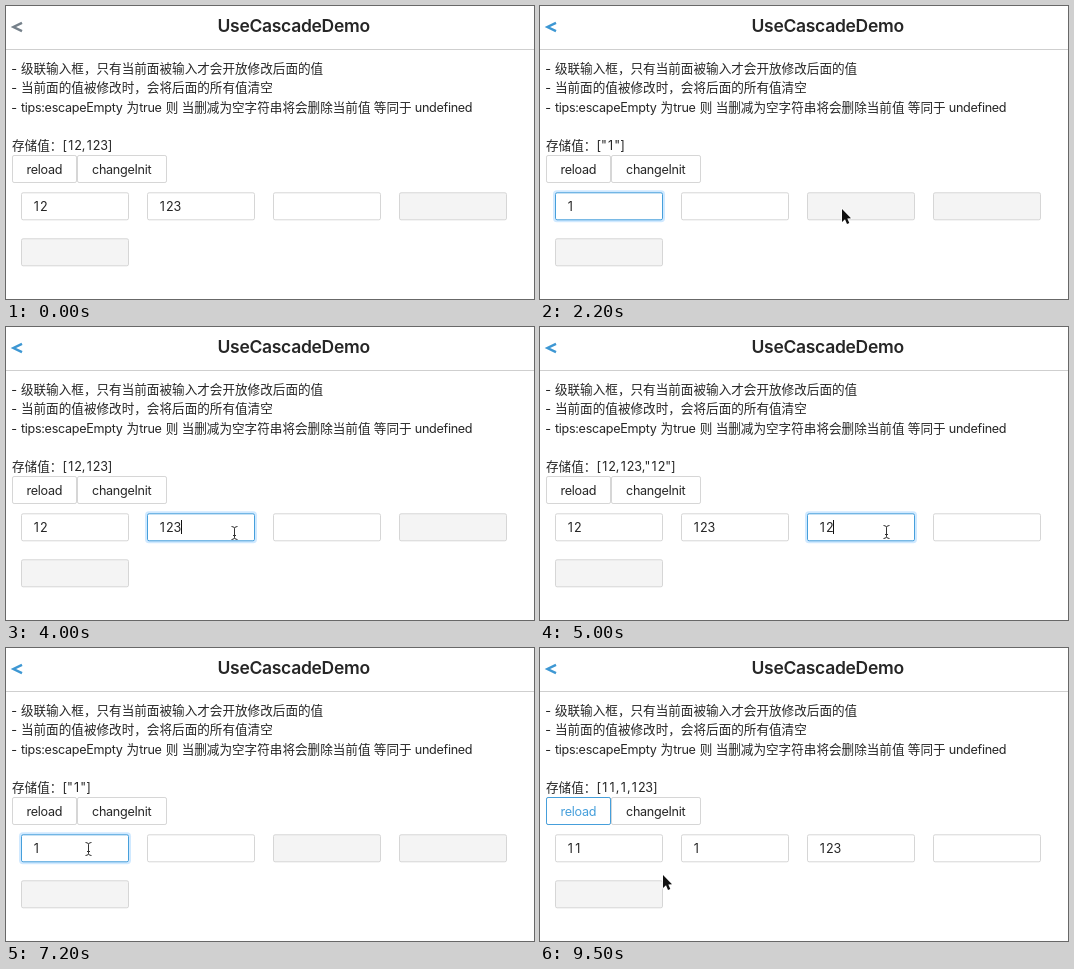
Animation, 528 px wide and 293 px high, one loop 9900 ms. Source, as an HTML page with a canvas:

```html
<!DOCTYPE html>
<html lang="zh">
<head>
<meta charset="utf-8">
<title>UseCascadeDemo</title>
<style>
html, body { margin: 0; width: 100%; height: 100%; overflow: hidden; background: #fff; }
canvas { display: block; width: 528px; height: 293px; }
</style>
</head>
<body>
<canvas id="stage"></canvas>
<script>
const W = 528, H = 293, LOOP = 9900, TICK = 100;
const BLUE = '#469fdb', INK = '#262626', BORDER = '#d6d6d6';
const LATIN = 'Inter, Roboto, sans-serif';
const HAN = '"Noto Sans CJK SC", "Noto Sans CJK", sans-serif';
const DIGIT = 7.45; // advance of a tabular figure

const canvas = document.getElementById('stage');
const ctx = canvas.getContext('2d');
const dpr = window.devicePixelRatio || 1;
canvas.width = W * dpr;
canvas.height = H * dpr;

const NOTES = [
  '- 级联输入框，只有当前面被输入才会开放修改后面的值',
  '- 当前面的值被修改时，会将后面的所有值清空',
  '- tips:escapeEmpty 为true 则 当删减为空字符串将会删除当前值 等同于 undefined'
];

const buttons = [
  { id: 'reload', x: 6, y: 149, w: 65, h: 28, tx: 20.5 },
  { id: 'changeInit', x: 71, y: 149, w: 90, h: 28, tx: 86 }
];
const inputs = [[15, 186.3], [141, 186.3], [267, 186.3], [393, 186.3], [15, 232.3]]
  .map(([x, y]) => ({ x, y, w: 108, h: 28 }));

// What the user does: focus is an input index or a button id.
const steps = [
  { t: 0, vals: [12, 123], focus: null },
  { t: 700, vals: [12, 123], focus: 0 },
  { t: 1500, vals: ['1'], focus: 0 },
  { t: 2600, vals: [12, 123], focus: 'reload' },
  { t: 3600, vals: [12, 123], focus: 1 },
  { t: 4600, vals: [12, 123], focus: 2 },
  { t: 4800, vals: [12, 123, '1'], focus: 2 },
  { t: 5000, vals: [12, 123, '12'], focus: 2 },
  { t: 5700, vals: [11, 1, 123], focus: 'changeInit' },
  { t: 6500, vals: [11, 1, 123], focus: 0 },
  { t: 6600, vals: ['1'], focus: 0 },
  { t: 8100, vals: [11, 1, 123], focus: 'reload' }
];

// Pointer path: time, x, y.
const path = [
  [200, 242, 275], [300, 241, 265], [400, 241, 265], [500, 284, 246],
  [700, 104, 206], [1100, 88, 205], [2000, 88, 205],
  [2200, 302, 203], [2500, 44, 166], [2700, 50, 165], [2800, 91, 164],
  [3000, 140, 176], [3500, 226, 205], [3900, 228, 206], [4100, 228, 206],
  [4500, 342, 205], [5100, 346, 205], [5600, 125, 166], [5900, 127, 167],
  [6100, 127, 167], [6500, 86, 203], [7100, 82, 201], [7400, 82, 201],
  [8000, 42, 166], [8400, 44, 167], [9000, 123, 227]
];

const ease = p => p * p * (3 - 2 * p);
const inside = (b, p) => p.x >= b.x && p.x <= b.x + b.w && p.y >= b.y && p.y <= b.y + b.h;
const stepAt = t => steps.filter(s => s.t <= t).pop();

function pointerAt(t) {
  if (t < path[0][0]) return null;
  const i = path.findIndex(k => k[0] > t);
  if (i < 0) {
    const [, x, y] = path[path.length - 1];
    return { x, y };
  }
  const [t0, x0, y0] = path[i - 1], [t1, x1, y1] = path[i];
  const p = ease((t - t0) / (t1 - t0));
  return { x: x0 + (x1 - x0) * p, y: y0 + (y1 - y0) * p };
}

// Draws mixed text run by run, each figure centred in its cell; returns the end x.
function text(str, x, y, { color = INK, size = 12.6, weight = 400, spacing = -0.3 } = {}) {
  ctx.fillStyle = color;
  ctx.wordSpacing = '0.9px';
  for (const run of str.match(/[\u2e80-\uffef]+|\d|[^\d\u2e80-\uffef]+/g) || []) {
    const han = /[\u2e80-\uffef]/.test(run), digit = /\d/.test(run);
    ctx.font = `${weight} ${size}px ${han ? HAN : LATIN}`;
    ctx.letterSpacing = han || digit ? '0px' : spacing + 'px';
    const width = ctx.measureText(run).width;
    const cell = digit ? DIGIT : width;
    ctx.fillText(run, x + (cell - width) / 2, y);
    x += cell;
  }
  return x;
}

function box(b, fill, stroke) {
  ctx.beginPath();
  ctx.roundRect(b.x + 0.5, b.y + 0.5, b.w - 1, b.h - 1, 1.6);
  ctx.fillStyle = fill;
  ctx.fill();
  ctx.strokeStyle = stroke;
  ctx.lineWidth = 1;
  ctx.stroke();
}

function glow(b, spread, alpha) {
  ctx.beginPath();
  ctx.roundRect(b.x - spread, b.y - spread, b.w + 2 * spread, b.h + 2 * spread, 2 + spread);
  ctx.fillStyle = `rgba(24,144,255,${alpha})`;
  ctx.fill();
}

function poly(points, close) {
  ctx.beginPath();
  points.forEach(([x, y]) => ctx.lineTo(x, y));
  if (close) ctx.closePath();
}

function drawHeader(t) {
  poly([[16, 16.8], [7.4, 21], [16, 25.2]]);
  ctx.strokeStyle = t < 200 ? '#75808a' : '#3d97d3';
  ctx.lineWidth = 2.4;
  ctx.stroke();
  text('UseCascadeDemo', 211.5, 26, { size: 17.5, weight: 600 });
  ctx.fillStyle = '#cfcfcf';
  ctx.fillRect(0, 43, W, 1);
}

function drawButtons(t, state, hover) {
  const active = buttons.find(b => b.id === state.focus);
  buttons.forEach(b => box(b, '#fff', BORDER));
  if (active) {
    const age = t - state.t;
    const fade = 1 - age / 1100;
    if (fade > 0) {
      const spread = 3 * Math.min(1, (age + 100) / 300);
      for (let k = 1; k <= 3; k++) glow(active, spread * k / 3, 0.08 * fade);
    }
    box(active, '#fff', BLUE);
  }
  for (const b of buttons) {
    const hot = b === active || (hover && inside(b, hover));
    if (hot && b !== active) box(b, '#fff', BLUE);
    text(b.id, b.tx, 167.5, { color: hot ? BLUE : INK });
  }
}

function drawInputs(t, state) {
  inputs.forEach((b, i) => {
    const focused = state.focus === i;
    if (focused) glow(b, 2, 0.2);
    box(b, i <= state.vals.length ? '#fff' : '#f4f4f4', focused ? BLUE : BORDER);
    const end = text(String(state.vals[i] ?? ''), b.x + 11.7, b.y + 18.2);
    if (focused && (t - state.t) % 1200 < 600) {
      ctx.fillStyle = '#111';
      ctx.fillRect(Math.floor(end), Math.round(b.y + 7), 1, 14);
    }
  });
}

function outline(fill, stroke, width) {
  ctx.lineJoin = 'round';
  ctx.strokeStyle = stroke;
  ctx.lineWidth = width;
  ctx.stroke();
  ctx.fillStyle = fill;
  ctx.fill();
}

function arrow() {
  poly([[0, 0], [0, 13], [3, 10.3], [5, 15], [7.3, 14], [5.3, 9.5], [9, 9.3]], true);
  outline('#111', '#fff', 1.4);
}

function beam() {
  ctx.beginPath();
  ctx.moveTo(-3, -6.5);
  ctx.quadraticCurveTo(0, -6.5, 0, -4.5);
  ctx.quadraticCurveTo(0, -6.5, 3, -6.5);
  ctx.moveTo(0, -4.5);
  ctx.lineTo(0, 4.5);
  ctx.moveTo(-3, 6.5);
  ctx.quadraticCurveTo(0, 6.5, 0, 4.5);
  ctx.quadraticCurveTo(0, 6.5, 3, 6.5);
  ctx.moveTo(-1.5, 2.5);
  ctx.lineTo(1.5, 2.5);
  ctx.strokeStyle = '#333';
  ctx.lineWidth = 1;
  ctx.stroke();
}

function hand() {
  ctx.beginPath();
  ctx.moveTo(-1.5, 9.5);
  ctx.lineTo(-1.7, 1.5);
  ctx.quadraticCurveTo(0, -1.2, 1.5, 1.5);
  ctx.lineTo(1.7, 5.5);
  ctx.quadraticCurveTo(3.3, 4, 4.3, 6);
  ctx.quadraticCurveTo(6, 4.8, 6.8, 7);
  ctx.quadraticCurveTo(9, 6, 9, 8.5);
  ctx.quadraticCurveTo(9.2, 12, 7.2, 14);
  ctx.lineTo(7.2, 16);
  ctx.lineTo(-0.5, 16);
  ctx.quadraticCurveTo(-2, 13, -4.8, 10);
  ctx.quadraticCurveTo(-5.2, 7, -1.5, 9.5);
  ctx.closePath();
  outline('#fff', '#222', 1.8);
  ctx.beginPath();
  for (const x of [1.6, 3.9, 6.2]) {
    ctx.moveTo(x, 10);
    ctx.lineTo(x, 13.5);
  }
  ctx.lineWidth = 0.8;
  ctx.stroke();
}

function drawPointer(p, state) {
  const over = list => list.findIndex(b => inside(b, p));
  const field = over(inputs);
  const shape = over(buttons) >= 0 ? hand
    : field >= 0 && field <= state.vals.length ? beam : arrow;
  ctx.save();
  ctx.translate(Math.round(p.x) + (shape === beam ? 0.5 : 0), Math.round(p.y));
  shape();
  ctx.restore();
}

function draw(t) {
  const state = stepAt(t);
  ctx.setTransform(dpr, 0, 0, dpr, 0, 0);
  ctx.fillStyle = '#fff';
  ctx.fillRect(0, 0, W, H);
  drawHeader(t);
  NOTES.forEach((line, i) => text(line, 5.3, 67 + 19.25 * i));
  text('存储值：' + JSON.stringify(state.vals), 6, 143.5, { spacing: 0 });
  drawButtons(t, state, pointerAt(t - TICK)); // hover colour lags one tick
  drawInputs(t, state);
  const p = pointerAt(t);
  if (p) drawPointer(p, state);
}

const start = performance.now();
function frame() {
  const t = (performance.now() - start) % LOOP;
  draw(Math.floor(t / TICK) * TICK);
  requestAnimationFrame(frame);
}
frame();
</script>
</body>
</html>
```
